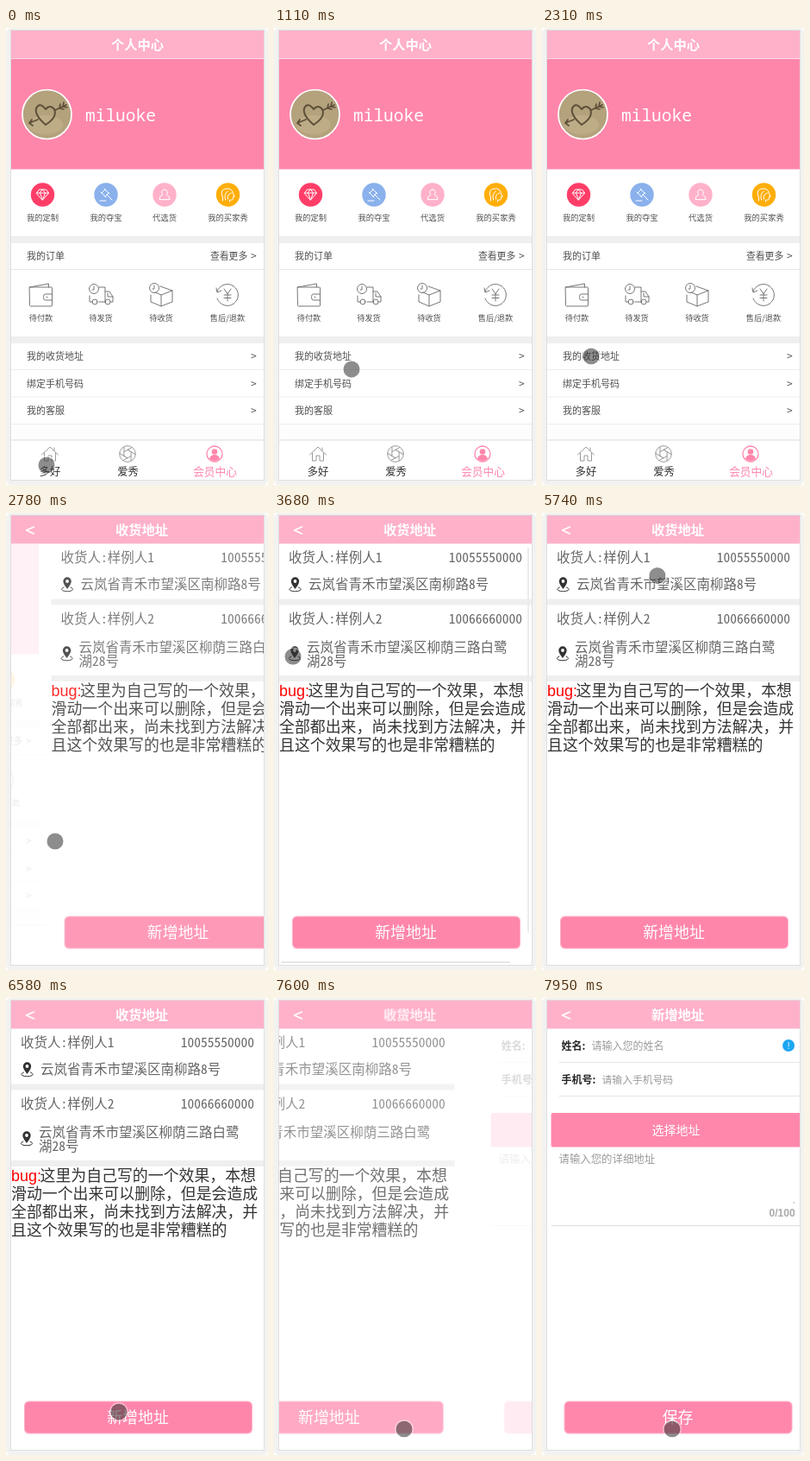
These frames come from a looping animation (304x529 px, 7990 ms). An HTML page:

```html
<!DOCTYPE html>
<html lang="zh-CN">
<head>
<meta charset="utf-8">
<title>个人中心</title>
<style>
html, body { margin: 0; width: 100%; height: 100%; overflow: hidden; background: #fff; }
svg { display: block; width: 100%; height: 100%; font-family: "Noto Sans CJK SC", "Noto Sans CJK", sans-serif; font-weight: 300; }
.half { font-family: "Noto Sans Mono CJK SC", "Noto Sans CJK SC", monospace; }
.latin { font-family: "Liberation Sans", sans-serif; }
.mono { font-family: "Noto Sans Mono", "DejaVu Sans Mono", monospace; }
.line { fill: none; stroke-width: 1; stroke-linecap: round; stroke-linejoin: round; }
</style>
</head>
<body>
<svg id="stage" viewBox="0 0 304 529"></svg>
<script>
const LOOP = 7990, WIDTH = 293, SLIDE = 500;
const PINK = '#ff86ab', PALE = '#ffb1ca', GREY = '#efefef', TEXT = '#505050';

const text = (x, y, size, str, fill = TEXT, extra = '') =>
  `<text x="${x}" y="${y}" font-size="${size}" fill="${fill}" ${extra}>${str}</text>`;
const rect = (x, y, w, h, fill, r = 0) =>
  `<rect x="${x}" y="${y}" width="${w}" height="${h}" rx="${r}" fill="${fill}"/>`;
const circle = (x, y, r, fill, extra = '') => `<circle cx="${x}" cy="${y}" r="${r}" fill="${fill}" ${extra}/>`;
const rule = (x, y, fill = '#e6e6e6') => rect(x, y, 320 - x, 1, fill);
const icon = (x, y, d, stroke, extra = '') =>
  `<g transform="translate(${x} ${y})"><path class="line" stroke="${stroke}" d="${d}" ${extra}/></g>`;
const middle = 'text-anchor="middle"', end = 'text-anchor="end"', bold = 'font-weight="bold"';

const person = 'M0 -6a3.2 3.2 0 0 1 2 5.8q4 1.5 4 5.8h-12q0-4.3 4-5.8a3.2 3.2 0 0 1 2-5.8';

function badges() {
  const items = [
    [42.5, '#ff3e68', '我的定制', 'M-7-2l3-4h8l3 4l-7 8zM-7-2h14M-3-2l3 8l3-8l-3-4z'],
    [116, '#8ab1ec', '我的夺宝', 'M-2-7l6 6M-6-3l6 6M-1-6l-4 4M3-2l-4 4M1 0l6 6M-7 7h7'],
    [184, PALE, '代选货', person],
    [257.5, '#ffae08', '我的买家秀', 'M-6 7v-4q-4-9 4-10q7-1 8 6l2 3h-2q1 5-4 4v2M-3 6q-2-8 3-10M0 5q-1-6 4-7']
  ];
  return items.map(([x, fill, label, d]) =>
    circle(x, 193, 13.7, fill) + icon(x, 193, d, '#fff') + text(x, 223, 9.3, label, TEXT, middle)).join('');
}

function orders() {
  const items = [
    [40.5, '待付款', 'M-13-9l22-4v4M-13-9h25q1 0 1 1v20q0 1-1 1h-24q-1 0-1-1zM13-1h-8q-2 0-2 3.5t2 3.5h8M6.5 2.5h1'],
    [110, '待发货', 'M-2-9h7v17h-7M-13 1v7h3M5-4h5l4 6v6h-3M6 8h-1M8-2v4h6M-4 8h-1M-10 8a3 3 0 1 0 6 0a3 3 0 1 0-6 0M5 8a3 3 0 1 0 6 0a3 3 0 1 0-6 0M-13.5-7a5.5 5.5 0 1 0 11 0a5.5 5.5 0 1 0-11 0M-8-10v4h-2'],
    [180, '待收货', 'M-1-10l14 5v13l-13 5l-12-5v-8M13-5l-13 5l-7-3M0 0v13M-13.5-8a5.5 5.5 0 1 0 11 0a5.5 5.5 0 1 0-11 0M-8-11v4h-2'],
    [257, '售后/退款', 'M-12-4a12.5 12.5 0 1 1 0 8M-13-8l1 5l5-2M-4-7l4 6l4-6M0-1v8M-4 0h8M-4 3.5h8']
  ];
  return items.map(([x, label, d]) =>
    icon(x, 309, d, '#777') + text(x, 339, 9.2, label, TEXT, middle)).join('');
}

function avatar() {
  return circle(47.5, 100, 28.5, '#b4a27d', 'stroke="#fff" stroke-width="1.7"') +
    '<ellipse cx="46" cy="112" rx="20" ry="11" fill="#c3b28d" opacity=".6"/>' +
    icon(47, 101, 'M-1-7q-7-9-11-1q-2 8 11 19q14-9 10-18q-5-6-10 0z', '#5d4f38', 'style="stroke-width:2"') +
    icon(47, 101, 'M-20 9l10-4M10-6l13-6M-20 9l3-4M-20 9l4 3M16-13l-1 5l5 1M20-15l-1 5l5 1', '#5d4f38', 'style="stroke-width:1.7"');
}

function tabs() {
  const blades = [0, 60, 120, 180, 240, 300].map(a =>
    `<path class="line" stroke="#999" d="M-4 -2.5L5-7.5" transform="translate(141 493) rotate(${a})"/>`).join('');
  return rect(6, 459, WIDTH, 18, '#fdfdfd') + rule(6, 476.5, '#dcdcdc') +
    icon(51, 493, 'M-9.5 1l9.5-9l9.5 9M-6.5-1v9h4.5v-6h4v6h4.5v-9M5-7v3', '#999') +
    circle(141, 493, 9.3, 'none', 'stroke="#999"') + blades +
    circle(242, 493, 9, 'none', `stroke="${PINK}" stroke-width="1.3"`) +
    circle(242, 490.5, 3.3, PINK) + `<path d="M236 499q1-5 6-5t6 5q-6 4-12 0" fill="${PINK}"/>` +
    text(51, 518, 12.3, '多好', '#333', middle) + text(141.5, 518, 12.3, '爱秀', '#333', middle) +
    text(242.5, 518, 12.7, '会员中心', PINK, middle);
}

function profilePage() {
  const menu = ['我的收货地址', '绑定手机号码', '我的客服'].map((label, i) => {
    const y = 384 + i * 31.5;
    return text(24, y, 11, label) + text(284, y, 12, '&gt;') + rule(6, y + 11, '#eee');
  }).join('');
  return rect(6, 36, WIDTH, 487, '#fff') + rect(6, 36, WIDTH, 127.5, PINK) + avatar() +
    text(92, 108, 19.5, 'miluoke', '#fff', 'class="mono" font-weight="500"') + badges() +
    rect(6, 241, WIDTH, 8, GREY) + text(24, 268, 11, '我的订单') + text(237, 268, 10.8, '查看更多') +
    text(284, 268, 12, '&gt;') + rule(6, 279) + orders() + rect(6, 357, WIDTH, 8, GREY) + menu + tabs();
}

const pin = (x, y) =>
  `<g transform="translate(${x} ${y})"><path class="line" d="M-4 4q-6 3 1 4.500q3 .5 6 0q7-1.500 1-4.500" stroke="#333"/>` +
  '<path d="M0 6q-4.7-6-4.7-9a4.7 4.700 0 0 1 9.4 0q0 3-4.7 9z" fill="#333"/>' + circle(0, -3, 1.9, '#fff') + '</g>';

const button = label =>
  rect(21, 466.5, 265, 38, PALE, 5.5) + rect(22, 467.5, 263, 36, PINK, 5) + text(153, 491.5, 17.9, label, '#fff', middle);

function addressPage() {
  const half = (x, y, str, extra = '') => text(x, y, 15.5, str, '#666', `class="half" ${extra}`);
  const note = ['滑动一个出来可以删除，但是会造成', '全部都出来，尚未找到方法解决，并', '且这个效果写的也是非常糟糕的'];
  return rect(6, 36, WIDTH, 487, '#fff') +
    half(17, 57, '收货人:样例人1') + half(288, 57, '10055550000', end) +
    pin(24.5, 82) + half(40, 88, '云岚省青禾市望溪区南柳路8号') + rect(6, 99.5, WIDTH, 7, GREY) +
    half(17, 128, '收货人:样例人2') + half(288, 128, '10066660000', end) +
    pin(24, 162) + half(38, 161, '云岚省青禾市望溪区柳荫三路白鹭') + half(38, 177, '湖28号') +
    rect(6, 188, WIDTH, 7, GREY) +
    text(6, 212, 18, 'bug:', '#f00', 'class="latin"') + text(39.5, 212, 17.9, '这里为自己写的一个效果，本想', '#333') +
    note.map((str, i) => text(6, 233 + i * 21, 17.9, str, '#333')).join('') + button('新增地址');
}

function formPage() {
  const hint = '#999';
  return rect(6, 36, WIDTH, 487, '#fff') +
    text(18, 60, 12, '姓名:', '#222', bold) + text(53, 60, 12, '请输入您的姓名', hint) + rule(15, 74) +
    circle(281.5, 55, 7, '#1ba5f3') + text(281.5, 59, 10, '!', '#fff', `class="latin" ${middle}`) +
    text(18, 99, 12, '手机号:', '#222', bold) + text(65, 99, 11.8, '请输入手机号码', hint) + rule(15, 113) +
    rect(6, 133, WIDTH, 39.5, PINK, 2) + text(151, 158, 14, '选择地址', '#fff', middle) +
    text(15, 191, 12.4, '请输入您的详细地址', hint) + circle(287.5, 237, 1, '#ccc') +
    text(289, 252.5, 12, '0/100', '#aaa', `class="latin" ${bold} ${end}`) + rule(6, 263, '#ddd') + button('保存');
}

const titles = ['个人中心', '收货地址', '新增地址'];
const pages = [profilePage(), addressPage(), formPage()];
const stage = document.getElementById('stage');
stage.innerHTML =
  '<clipPath id="screen"><rect x="6" y="3" width="293" height="520"/></clipPath>' +
  rect(0, 0, 304, 529, '#f2f2f2', 6) + rect(5, 2, 295, 522, '#dedede') + rect(6, 3, WIDTH, 520, '#fff') +
  '<g clip-path="url(#screen)">' + pages.map((p, i) => `<g id="page${i}">${p}</g>`).join('') +
  `<g id="bars">${rect(294, 40, 2, 446, '#ebebeb', 1)}${rect(8, 519, 266, 2, '#e6e6e6', 1)}</g>` +
  rect(6, 3, WIDTH, 32.5, PALE) +
  titles.map((t, i) => `<g id="title${i}">${text(i ? 157.5 : 152.5, 25, 15.3, t, '#fff', `${middle} ${bold}`)}</g>`).join('') +
  '<path id="back" class="line" d="M32.5 16l-9 4l9 4" stroke="#fff" style="stroke-width:1.6"/></g>' +
  '<g id="pointer">' + circle(0, 0, 9.6, '#333', 'fill-opacity=".56"') +
  circle(0, 0, 10.2, 'none', 'stroke="#fff" stroke-opacity=".5" stroke-width="1.2"') + '</g>';
const el = id => document.getElementById(id);

// Pointer stops: time, x, y.
const path = [
  [0, 47, 506], [370, 47, 506], [600, 220, 440], [720, 274, 375], [860, 215, 315], [1110, 90, 395],
  [1170, 90, 398], [1550, 17, 392], [1950, 47, 386], [2130, 47, 387], [2310, 57, 380], [3060, 57, 380],
  [3370, 40, 290], [3680, 22, 167], [3880, 28, 15], [4160, 76, 190], [4280, 78, 185], [4460, 114, 90],
  [4580, 121, 85], [4820, 121, 85], [5120, 134, 72], [5740, 134, 72], [6100, 81, 270], [6520, 131, 479],
  [6580, 131, 479], [6740, 118, 488], [6940, 149, 490], [7260, 149, 490], [7310, 151, 499], [LOOP, 151, 499]
];

const clamp = v => Math.max(0, Math.min(1, v));

// CSS "ease": cubic-bezier(.25, .1, .25, 1)
function ease(x) {
  if (x <= 0 || x >= 1) return clamp(x);
  const bezier = (a, b, u) => 3 * a * u * (1 - u) ** 2 + 3 * b * u * u * (1 - u) + u ** 3;
  let lo = 0, hi = 1;
  for (let i = 0; i < 20; i++) {
    const mid = (lo + hi) / 2;
    if (bezier(.25, .25, mid) < x) lo = mid; else hi = mid;
  }
  return bezier(.1, 1, lo);
}

// When each page begins to slide in.
const starts = [-1e4, 2510, 7532, 1e5];

function draw(t) {
  pages.forEach((_, i) => {
    const enter = ease((t - starts[i]) / SLIDE);
    const leaving = t >= starts[i + 1] ? ease((t - starts[i + 1] + 33) / SLIDE) : 0;
    const page = el('page' + i);
    page.setAttribute('transform', `translate(${WIDTH * (1 - enter - leaving)} 0)`);
    page.setAttribute('opacity', enter * (1 - leaving));
    const titleIn = clamp((t - starts[i]) / 200), titleOut = clamp((t - starts[i + 1]) / 200);
    el('title' + i).setAttribute('opacity', titleIn * (1 - titleOut));
  });
  el('back').setAttribute('opacity', clamp((t - starts[1]) / 200));
  el('bars').setAttribute('opacity', clamp((t - 3020) / 150) * clamp((4080 - t) / 350));

  const k = path.findIndex(p => p[0] > t), [t0, x0, y0] = path[k - 1], [t1, x1, y1] = path[k];
  const f = (t - t0) / (t1 - t0);
  el('pointer').setAttribute('transform', `translate(${x0 + (x1 - x0) * f} ${y0 + (y1 - y0) * f})`);
}

const began = performance.now();
function tick() {
  draw((performance.now() - began) % LOOP);
  requestAnimationFrame(tick);
}
tick();
</script>
</body>
</html>
```
